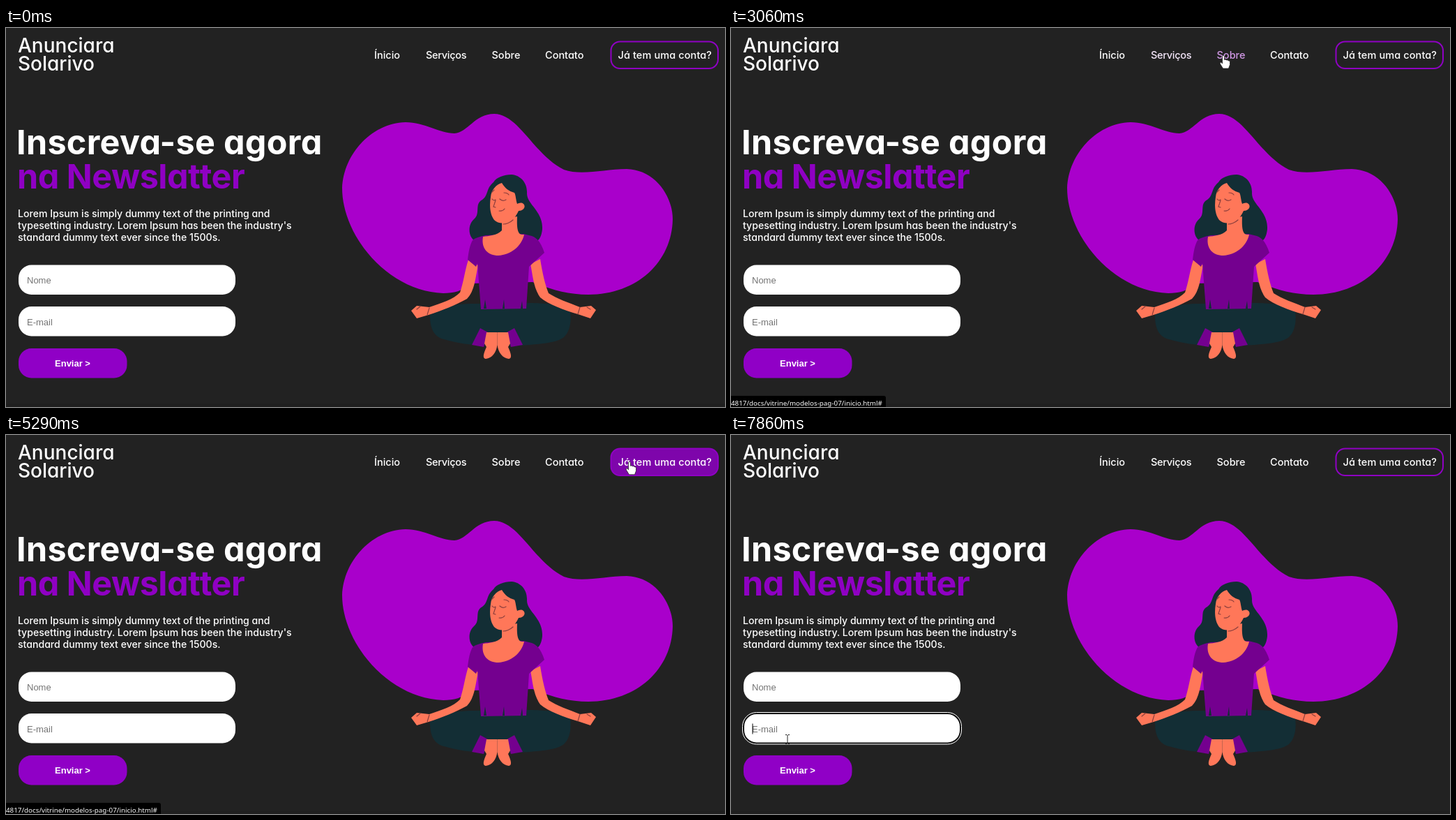
These frames come from a looping animation (1031x543 px, 8000 ms). An HTML page:

```html
<!DOCTYPE html>
<html lang="pt-BR">
<head>
<meta charset="utf-8">
<title>Newslatter</title>
<style>
  html, body { margin: 0; width: 100%; height: 100%; overflow: hidden; background: #222; }
  svg { display: block; }
  text { fill: #fff; font-family: Inter, Lato, sans-serif; font-feature-settings: "cv11"; white-space: pre; }
  .logo { font-size: 28px; font-weight: 500; }
  .nav { font-size: 14.5px; font-weight: 500; }
  .title { font-size: 48.5px; font-weight: 700; letter-spacing: .3px; }
  .accent { fill: #8f00c3; letter-spacing: -.5px; }
  .copy { font-size: 14.1px; font-weight: 500; }
  .hint { font: 13px "Liberation Sans", Arial, sans-serif; fill: #757575; }
  .send { font: bold 13px "Liberation Sans", Arial, sans-serif; }
  .url { font: 9.8px "Noto Sans", "Open Sans", sans-serif; }
  .skin { fill: #ff7759; }
  .teal { fill: #132e35; }
  .shirt { fill: #74008f; }
  .line { fill: none; stroke: #8c3f3d; stroke-width: 1.2; stroke-linecap: round; }
</style>
</head>
<body>
<svg width="1031" height="543" viewBox="0 0 1031 543">
  <rect width="1031" height="543" fill="#222"/>
  <rect y="538" width="1031" height="5" fill="#1f1f1f"/>

  <text class="logo" x="17" y="35">Anunciara</text>
  <text class="logo" x="17" y="61">Solarivo</text>

  <g class="nav">
    <text class="link" x="528" y="43.5">Ínicio</text>
    <text class="link" x="602" y="43.5" letter-spacing="-.3">Serviços</text>
    <text class="link" x="696.5" y="43.5">Sobre</text>
    <text class="link" x="773" y="43.5">Contato</text>
    <rect id="account" x="867.5" y="19.5" width="153.5" height="38.5" rx="13"
      fill="#8f00c3" stroke="#8f00c3" stroke-width="2"/>
    <text x="877.5" y="43.5" letter-spacing=".1">Já tem uma conta?</text>
  </g>

  <text class="title" x="15" y="181">Inscreva-se agora</text>
  <text class="title accent" x="16" y="230">na Newslatter</text>

  <g class="copy">
    <text x="17" y="271">Lorem Ipsum is simply dummy text of the printing and</text>
    <text x="17" y="288">typesetting industry. Lorem Ipsum has been the industry's</text>
    <text x="17" y="305">standard dummy text ever since the 1500s.</text>
  </g>

  <g id="form"></g>
  <rect x="18" y="459" width="155.5" height="42.5" rx="18.5" fill="#9000c6"/>
  <text class="send" x="95.5" y="485" text-anchor="middle">Enviar &gt;</text>

  <path fill="#a900cb" d="M482 229C484 180 525 136 573 135C600 135 622 151 643 151C662 150 672 123 700 123
    C735 123 757 182 800 203C826 212 858 202 890 202C930 203 956 240 956 274C955 335 905 382 835 382
    C805 382 780 374 755 364L665 366C655 377 642 380 627 380C550 378 482 300 482 229Z"/>

  <path class="teal" d="M725 210C738 211 748 222 747 237C747 253 770 262 769 288C768 298 765 305 757 308
    L674 306C663 301 661 283 671 274C681 266 671 252 683 246C692 240 688 230 699 221C703 214 714 210 725 210Z"/>
  <path class="teal" d="M672 395C640 395 607 402 608 412C608 430 613 442 628 446C648 452 668 454 684 455
    L735 455C768 453 789 451 800 443C809 434 811 420 809 405C797 396 775 394 745 394Z"/>
  <path class="skin" d="M663 332L677 340C673 358 672 377 661 388C645 397 624 405 606 411L589 416L581 405L589 398
    L607 400C625 394 641 389 651 379C656 365 658 347 663 332Z"/>
  <path class="skin" d="M752 338L766 331C769 350 773 368 778 380C790 388 806 393 823 400L839 398L846 404L838 416
    L820 410C800 404 778 396 766 386C756 372 755 352 752 338Z"/>
  <path class="line" d="M589 403L594 399M607 401L604 411M838 403L833 400M823 400L820 410"/>
  <path class="shirt" d="M688 297C679 299 670 301 668 306C664 314 663 325 662 332L674 342L676 337L681 403L746 402
    L750 342L772 322C768 310 763 301 754 298L742 295Z"/>
  <path class="skin" d="M711 274L711 290C705 297 692 298 684 299C681 316 691 326 706 326C724 325 739 313 743 296
    C735 297 732 292 733 270Z"/>
  <path class="skin" d="M711 222C703 224 696 232 695 242C693 255 694 267 700 275C707 282 720 280 727 274
    C731 270 733 266 735 262C742 262 746 256 742 252C739 249 735 251 733 252C731 246 731 239 729 236
    C721 234 715 229 711 222Z"/>
  <path class="line" d="M697 235L700 232M714 236Q719 236 721 239M697 245Q699 248 702 246M708 245Q712 249 717 246
    M702 247L699 256L702 257M707 262Q712 263 715 259M713 281Q720 281 727 275"/>
  <path class="teal" d="M685 402L687 389L689 402ZM712 402L714 389L715 402ZM738 402L740 391L741 402Z"/>
  <g id="foot">
    <path class="shirt" d="M680 430L691 436L685 457L668 454Z"/>
    <path class="skin" d="M689 436H704.5V454C703 465 697 473 688 474C682 473 686 464 689 457L686 452Z"/>
  </g>
  <use href="#foot" transform="matrix(-1 0 0 1 408 0) translate(-1000 0)" id="otherFoot"/>

  <g id="status">
    <path d="M0 527H219Q222 527 222 530V543H0Z" fill="#000"/>
    <text class="url" x="0" y="540.5">4817/docs/vitrine/modelos-pag-07/inicio.html#</text>
  </g>

  <g id="pointer">
    <path id="arrow" fill="#fff" stroke="#222" stroke-width=".8"
      d="M0 0V16L3.7 12.6L6.2 18.4L8.7 17.3L6.2 11.6H11.3Z"/>
    <path id="hand" fill="#fff" stroke="#222" stroke-width=".8"
      d="M-1.5 1.5Q0 -1 1.5 1.5V6.5Q3.2 5.2 4.3 7Q6 6 7 7.8Q9.3 7.3 9.5 9.5V13.5L7.5 19H-.5
      L-4.5 12.5Q-5.5 10.5 -4 10Q-2.8 9.8 -1.5 12Z"/>
    <path id="beam" fill="none" stroke="#222"
      d="M-3 -6.5H-1L0 -5.5L1 -6.5H3M0 -5.5V5.5M-3 6.5H-1L0 5.5L1 6.5H3"/>
  </g>
</svg>

<script>
const LOOP = 8000, FADE = 200, BLINK = 490;
const $ = id => document.getElementById(id);
const show = (id, on) => $(id).setAttribute('visibility', on ? 'visible' : 'hidden');

$('otherFoot').setAttribute('transform', 'translate(1409 0) scale(-1 1)');

const fields = [
  { id: 'name', hint: 'Nome', y: 339.5, focus: 6730, blur: 7790 },
  { id: 'mail', hint: 'E-mail', y: 399, focus: 7790, blur: LOOP }
];
$('form').innerHTML = fields.map(({ id, hint, y }) => `
  <rect id="${id}" x="18" y="${y}" width="311" height="42.5" rx="18.5" fill="#fff"/>
  <g id="${id}Ring" fill="none">
    <rect x="18" y="${y}" width="311" height="42.5" rx="18.5" stroke="#111" stroke-width="2"/>
    <rect x="16.5" y="${y - 1.5}" width="314" height="45.5" rx="20" stroke="#fff"/>
  </g>
  <text class="hint" x="30" y="${y + 26.5}">${hint}</text>
  <rect id="${id}Caret" x="30.5" y="${y + 14.5}" width="1" height="15"/>`).join('');

// pointer rests: [arrive ms, leave ms, x, y]
const stops = [
  [0, 460, 980, 525], [1000, 1000, 565, 140], [1260, 1340, 541, 51],
  [1460, 1500, 542, 45], [2140, 2200, 590, 40], [2540, 2860, 645, 40],
  [3060, 3060, 706, 39], [3400, 3800, 716, 40], [4400, 4880, 803, 36],
  [5490, 6070, 905, 38], [6080, 6080, 898, 45], [6330, 6330, 545, 232],
  [6600, 7350, 38, 360], [7460, LOOP, 81, 436]
];

function pointerAt(t) {
  const i = Math.max(0, stops.findLastIndex(stop => stop[0] <= t));
  const [, leave, x, y] = stops[i];
  if (t <= leave) return [x, y];
  const [arrive, , nx, ny] = stops[i + 1];
  const left = 1 - (t - leave) / (arrive - leave);
  const p = 1 - left * left;
  return [x + (nx - x) * p, y + (ny - y) * p];
}

const links = [...document.querySelectorAll('.link'), $('account')]
  .map(el => ({ el, box: el.getBBox() }));
const inputs = fields.map(field => $(field.id).getBBox());

const inside = (box, [x, y]) =>
  x >= box.x && x <= box.x + box.width && y >= box.y && y <= box.y + box.height;

// share of the last FADE ms spent over the box: a linear hover transition
function hover(box, t) {
  const n = 20;
  let hits = 0;
  for (let i = 0; i < n; i++) hits += inside(box, pointerAt(t - i * FADE / n));
  return hits / n;
}

const WHITE = [255, 255, 255], PURPLE = [143, 0, 195];
const mix = k => `rgb(${WHITE.map((c, i) => Math.round(c + (PURPLE[i] - c) * k))})`;

function draw(t) {
  const at = pointerAt(t);
  const overLink = links.some(({ box }) => inside(box, at));
  const overInput = inputs.some(box => inside(box, at));
  const kind = overLink ? 'hand' : overInput ? 'beam' : 'arrow';
  $('pointer').setAttribute('transform', `translate(${at})`);
  for (const id of ['arrow', 'hand', 'beam']) show(id, t >= 460 && id === kind);

  for (const { el, box } of links) {
    const k = hover(box, t);
    if (el.id === 'account') el.setAttribute('fill-opacity', k);
    else el.style.fill = mix(k);
  }

  for (const { id, focus, blur } of fields) {
    const active = t >= focus && t < blur;
    show(id + 'Ring', active);
    show(id + 'Caret', active && Math.floor((t - focus) / BLINK) % 2 === 0);
  }
  show('status', t >= 1540 && t < 6480);
}

let start;
function tick(now) {
  start ??= now;
  draw((now - start) % LOOP);
  requestAnimationFrame(tick);
}
draw(0);
requestAnimationFrame(tick);
</script>
</body>
</html>
```
